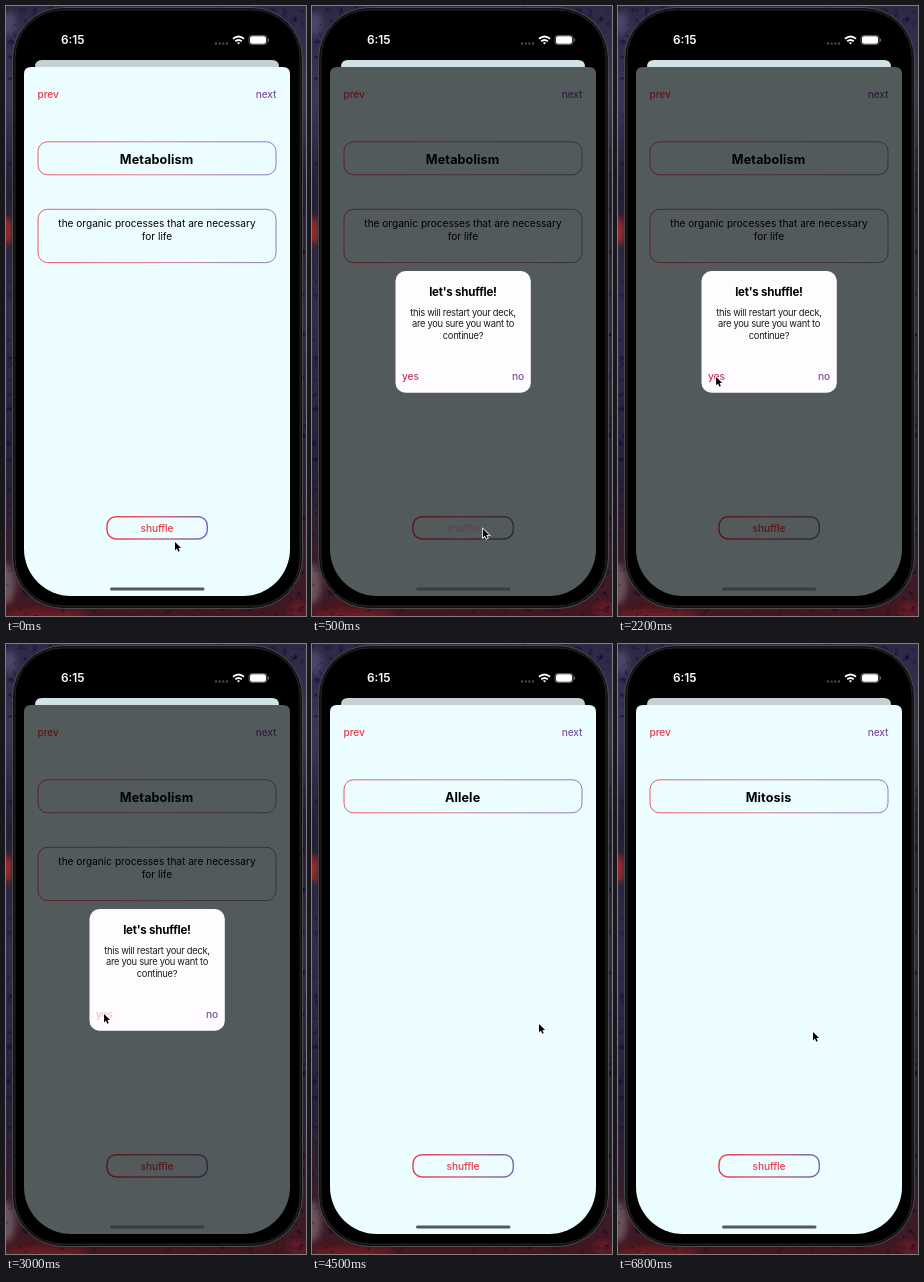
An HTML page that plays this animation: 300 px wide and 610 px high, repeating every 6900 ms.

```html
<!DOCTYPE html>
<html lang="en">
<head>
<meta charset="utf-8">
<title>Flashcards</title>
<style>
html, body { margin: 0; width: 100%; height: 100%; overflow: hidden; background: #000; }
svg { display: block; width: 300px; height: 610px; font-family: Inter, "Liberation Sans", sans-serif; }
.mid { text-anchor: middle; }
.body { font-size: 10.1px; }
.link { font-size: 10.2px; letter-spacing: -.1px; font-weight: 500; }
.term { font-size: 12.6px; letter-spacing: .12px; font-weight: 650; }
.note { font-size: 9.4px; letter-spacing: -.3px; fill: #1c1c1e; }
.line { fill: none; stroke: url(#edge); stroke-width: .85; }
.dim .tint { filter: brightness(.38); }
#sheet { fill: #ebfdff; }
#back { fill: #c5d2d5; }
#home { fill: #55595b; }
.dim #sheet { fill: #535a5c; }
.dim #back { fill: #d0e3e8; }
.dim #home { fill: #393d3e; }
#modal, #answer { visibility: hidden; }
.dim #modal, .long #answer { visibility: visible; }
</style>
</head>
<body>
<svg id="stage" viewBox="0 0 300 610">
  <defs>
    <linearGradient id="wall" x2="0" y2="1">
      <stop stop-color="#2b2944"/>
      <stop offset=".15" stop-color="#3a3658"/>
      <stop offset=".3" stop-color="#241f35"/>
      <stop offset=".5" stop-color="#302d4b"/>
      <stop offset=".75" stop-color="#25223a"/>
      <stop offset=".92" stop-color="#3a1e2b"/>
      <stop offset="1" stop-color="#43161e"/>
    </linearGradient>
    <linearGradient id="edge">
      <stop stop-color="#ee3a46"/>
      <stop offset=".45" stop-color="#d66378"/>
      <stop offset="1" stop-color="#7469b4"/>
    </linearGradient>
    <linearGradient id="warm"><stop stop-color="#d92d40"/><stop offset="1" stop-color="#a04684"/></linearGradient>
    <linearGradient id="cool"><stop stop-color="#8e4a96"/><stop offset="1" stop-color="#6758a8"/></linearGradient>
    <filter id="soft" x="-1" y="-1" width="3" height="3"><feGaussianBlur stdDeviation="3"/></filter>
    <filter id="grain" x="0" y="0" width="1" height="1">
      <feTurbulence baseFrequency=".12" numOctaves="2" seed="4"/>
      <feColorMatrix values="0 0 0 0 0  0 0 0 0 0  0 0 0 0 .03  2.4 0 0 0 -.9"/>
    </filter>
    <clipPath id="page"><rect x="18" y="61" width="266" height="529"/></clipPath>
  </defs>

  <rect width="300" height="610" fill="url(#wall)"/>
  <g filter="url(#soft)">
    <ellipse cx="1" cy="225" rx="5" ry="14" fill="#a82a25"/>
    <ellipse cx="0" cy="578" rx="9" ry="20" fill="#6b525c"/>
    <ellipse cx="40" cy="609" rx="42" ry="6" fill="#6c1a24"/>
    <ellipse cx="292" cy="604" rx="10" ry="7" fill="#6a1d27"/>
    <ellipse cx="3" cy="18" rx="7" ry="12" fill="#4b4866"/>
  </g>
  <rect width="300" height="610" filter="url(#grain)" opacity=".7"/>

  <rect x="6.5" y="1.5" width="290" height="601" rx="51" fill="#111" stroke="#4b4b4e"/>
  <rect x="9" y="4" width="285" height="596" rx="48" fill="#000" stroke="#252527"/>

  <g fill="#fff">
    <text x="55" y="38" font-size="11.8" font-weight="600">6:15</text>
    <path d="M209 37.5h13" stroke="#555" stroke-width="2" stroke-dasharray="2 1.7"/>
    <path d="M227 32.8q5.5-4.6 11 0M229.2 35.3q3.3-2.7 6.6 0" fill="none" stroke="#fff" stroke-width="1.8"/>
    <path d="M230.9 36.8q1.6-1.2 3.2 0l-1.6 1.8z"/>
    <rect x="243" y="29.5" width="18" height="9" rx="2.7" fill="none" stroke="#777" stroke-width=".8"/>
    <rect x="244" y="30.3" width="16" height="7.4" rx="2"/>
    <rect x="261.8" y="32.5" width="1" height="3" rx=".5" fill="#888"/>
  </g>

  <path id="back" d="M29 62v-1q0-7 7-7h230q7 0 7 7v1z"/>
  <path id="sheet" d="M18 68q0-7 7-7h252q7 0 7 7v475a47 47 0 0 1-47 47H65a47 47 0 0 1-47-47z"/>

  <g class="tint">
    <text class="link" x="31.5" y="92" fill="#e83a48">prev</text>
    <text class="link" x="270.5" y="92" text-anchor="end" fill="url(#cool)">next</text>
    <rect class="line" x="101" y="510.7" width="100.3" height="22.3" rx="9" style="stroke-width:1.4"/>
    <text id="shuffle" class="link mid" x="151" y="526" fill="#e83a48">shuffle</text>
  </g>
  <g clip-path="url(#page)"><g id="pager"></g></g>
  <g id="answer">
    <rect class="line tint" x="32" y="203.3" width="238" height="53.3" rx="9.5"/>
    <text class="body mid" x="151" y="221.3">the organic processes that are necessary</text>
    <text class="body mid" x="151" y="234">for life</text>
  </g>
  <rect id="home" x="104" y="581.6" width="94.5" height="3" rx="1.5"/>

  <g id="modal">
    <rect x="83.5" y="265" width="135.3" height="121.7" rx="10" fill="#fffcff"/>
    <text class="mid" x="151" y="290" font-size="11.5" font-weight="650" letter-spacing="-.2">let's shuffle!</text>
    <g class="note mid">
      <text x="151" y="309.5">this will restart your deck,</text>
      <text x="151" y="321.4">are you sure you want to</text>
      <text x="151" y="333.3">continue?</text>
    </g>
    <text id="yes" class="link" x="90" y="373.5" fill="url(#warm)">yes</text>
    <text class="link" x="212" y="373.5" text-anchor="end" fill="url(#cool)">no</text>
  </g>

  <path id="cursor" d="M0 0v8.4l1.9-1.8 1.4 3.1 1.4-.6-1.3-3.1h2.7z" fill="#000" stroke="#fff" stroke-width="1.5" paint-order="stroke"/>
</svg>
<script>
const LOOP = 6900, STEP = 100, PAGE = 266;
const SHUFFLED = 3100, SWIPE = 450, swipes = [3800, 5600];
const $ = id => document.getElementById(id);
// time, x, y of the pointer tip
const path = [
  [0, 169, 536], [300, 171, 523], [600, 171, 523], [1600, 101, 388], [2300, 98, 370], [3200, 98, 370],
  [3800, 230, 378], [4050, 125, 380], [4500, 227, 380],
  [5600, 229, 382], [5850, 125, 386], [6400, 195, 388], [6900, 195, 388]
];

// The first card is alone; the shuffled deck follows as pages side by side.
const card = (word, i) => `<g transform="translate(${i * PAGE})">
  <rect class="line tint" x="32" y="135.8" width="238" height="33" rx="9.5"/>
  <text class="term mid" x="150.6" y="157.6">${word}</text></g>`;
$("pager").innerHTML = ["Metabolism", "Watershed", "Allele", "Mitosis"].map(card).join("");

const ease = u => { u = Math.min(1, Math.max(0, u)); return u * u * (3 - 2 * u); };

function pointer(t) {
  const i = path.findIndex(p => p[0] > t);
  const [t0, x0, y0] = path[i - 1], [t1, x1, y1] = path[i];
  const k = ease((t - t0) / (t1 - t0));
  return [x0 + (x1 - x0) * k, y0 + (y1 - y0) * k];
}

// A pressed label dims, then recovers after release.
const press = (t, down, up) => 1 - .7 * ease((t - down) / 150) * (1 - ease((t - up) / 250));

function draw(now) {
  const t = Math.floor(now % LOOP / STEP) * STEP;
  $("stage").classList.toggle("dim", t >= 500 && t < SHUFFLED);
  $("stage").classList.toggle("long", t < SHUFFLED);
  const page = (t >= SHUFFLED) + swipes.reduce((sum, s) => sum + ease((t - s) / SWIPE), 0);
  $("pager").setAttribute("transform", `translate(${-page * PAGE})`);
  $("shuffle").style.opacity = press(t, 300, 500);
  $("yes").style.opacity = press(t, 2800, SHUFFLED);
  $("cursor").setAttribute("transform", `translate(${pointer(t)})`);
}

const start = performance.now();
function tick() {
  draw(performance.now() - start);
  requestAnimationFrame(tick);
}
tick();
</script>
</body>
</html>
```
